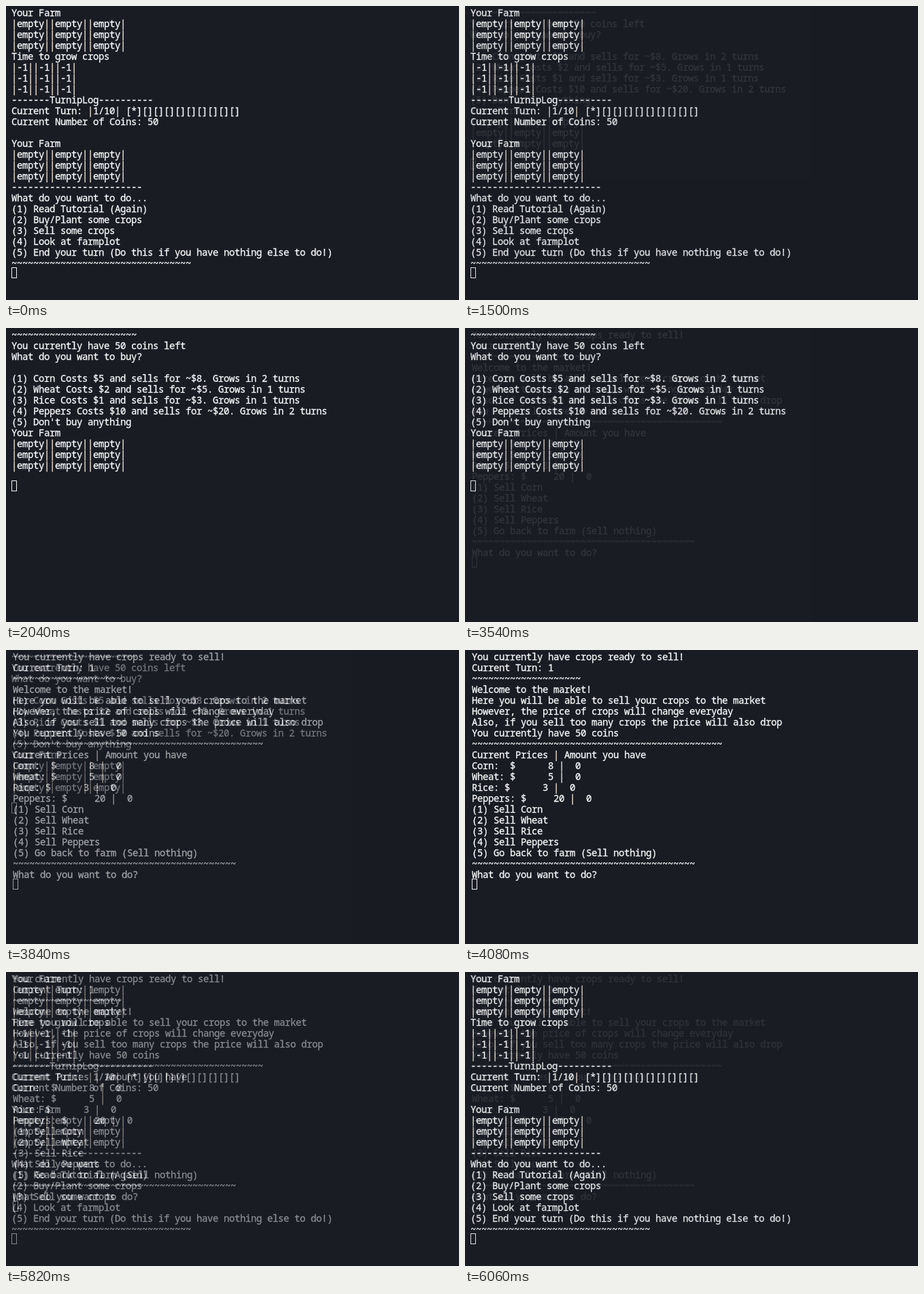
Write an HTML page that moves like this. It is 666 px wide and 432 px high and loops after 6120 ms.

```html
<!DOCTYPE html>
<html lang="en">
<head>
<meta charset="utf-8">
<title>Farm console</title>
<style>
html, body { margin: 0; width: 100%; height: 100%; overflow: hidden; background: #1a1c24; }
.screen {
  position: absolute; left: 0; top: 0; width: 666px; height: 432px;
  background: #1a1c24; color: #f8fafa;
}
pre {
  position: absolute; top: 2px; margin: 0;
  font: 14px/16px "Noto Sans Mono", "DejaVu Sans Mono", monospace;
  font-variant-ligatures: none;
  letter-spacing: calc(8px - 1ch); /* snap glyphs to 8px cells */
  -webkit-text-stroke: 0.3px;
}
.bar { color: #f6ecd8; }
.cursor { position: absolute; width: 8px; height: 16px; box-sizing: border-box; border: 1px solid #f0f2f4; }
</style>
</head>
<body>
<script>
const HOLD = 1500, STEP = 60, STEPS = 9;
const SPAN = HOLD + STEP * STEPS;

const grid = cell => Array(3).fill(`|${cell}|`.repeat(3)).join("\n");
const farm = "Your Farm\n" + grid("empty");
const wave = n => "~".repeat(n);
const dash = n => "-".repeat(n);

const home = `${farm}
Time to grow crops
${grid("-1")}
${dash(7)}TurnipLog${dash(10)}
Current Turn: |1/10| [*]${"[]".repeat(9)}
Current Number of Coins: 50

${farm}
${dash(24)}
What do you want to do...
(1) Read Tutorial (Again)
(2) Buy/Plant some crops
(3) Sell some crops
(4) Look at farmplot
(5) End your turn (Do this if you have nothing else to do!)
${wave(33)}
`;

const shop = `${wave(23)}
You currently have 50 coins left
What do you want to buy?

(1) Corn Costs $5 and sells for ~$8. Grows in 2 turns
(2) Wheat Costs $2 and sells for ~$5. Grows in 1 turns
(3) Rice Costs $1 and sells for ~$3. Grows in 1 turns
(4) Peppers Costs $10 and sells for ~$20. Grows in 2 turns
(5) Don't buy anything
${farm}

`;

const market = `You currently have crops ready to sell!
Current Turn: 1
${wave(20)}
Welcome to the market!
Here you will be able to sell your crops to the market
However, the price of crops will change everyday
Also, if you sell too many crops the price will also drop
You currently have 50 coins
${wave(46)}
Current Prices | Amount you have
Corn:  $      8 |  0
Wheat: $      5 |  0
Rice: $      3 |  0
Peppers: $     20 |  0
(1) Sell Corn
(2) Sell Wheat
(3) Sell Rice
(4) Sell Peppers
(5) Go back to farm (Sell nothing)
${wave(41)}
What do you want to do?
`;

// The cursor sits at the start of the row after the last line break.
function makeScreen(text, left) {
  const screen = document.createElement("div");
  screen.className = "screen";
  const row = text.split("\n").length - 1;
  const html = text.replace(/\|+/g, '<span class="bar">$&</span>');
  screen.innerHTML = `<pre style="left:${left}px">${html}</pre>
    <div class="cursor" style="left:${left}px;top:${row * 16}px"></div>`;
  document.body.append(screen);
  return screen;
}

const screens = [makeScreen(home, 8), makeScreen(shop, 8), makeScreen(market, 10)];

function draw() {
  const time = performance.now() % (SPAN * screens.length);
  const current = Math.floor(time / SPAN);
  const next = (current + 1) % screens.length;
  const fade = time % SPAN - HOLD;
  const alpha = fade < 0 ? 0 : (Math.floor(fade / STEP) + 1) / (STEPS + 1);
  screens.forEach((screen, i) => {
    screen.style.zIndex = i === next ? 2 : i === current ? 1 : 0;
    screen.style.opacity = i === next ? alpha : i === current ? 1 : 0;
  });
  requestAnimationFrame(draw);
}
draw();
</script>
</body>
</html>
```
